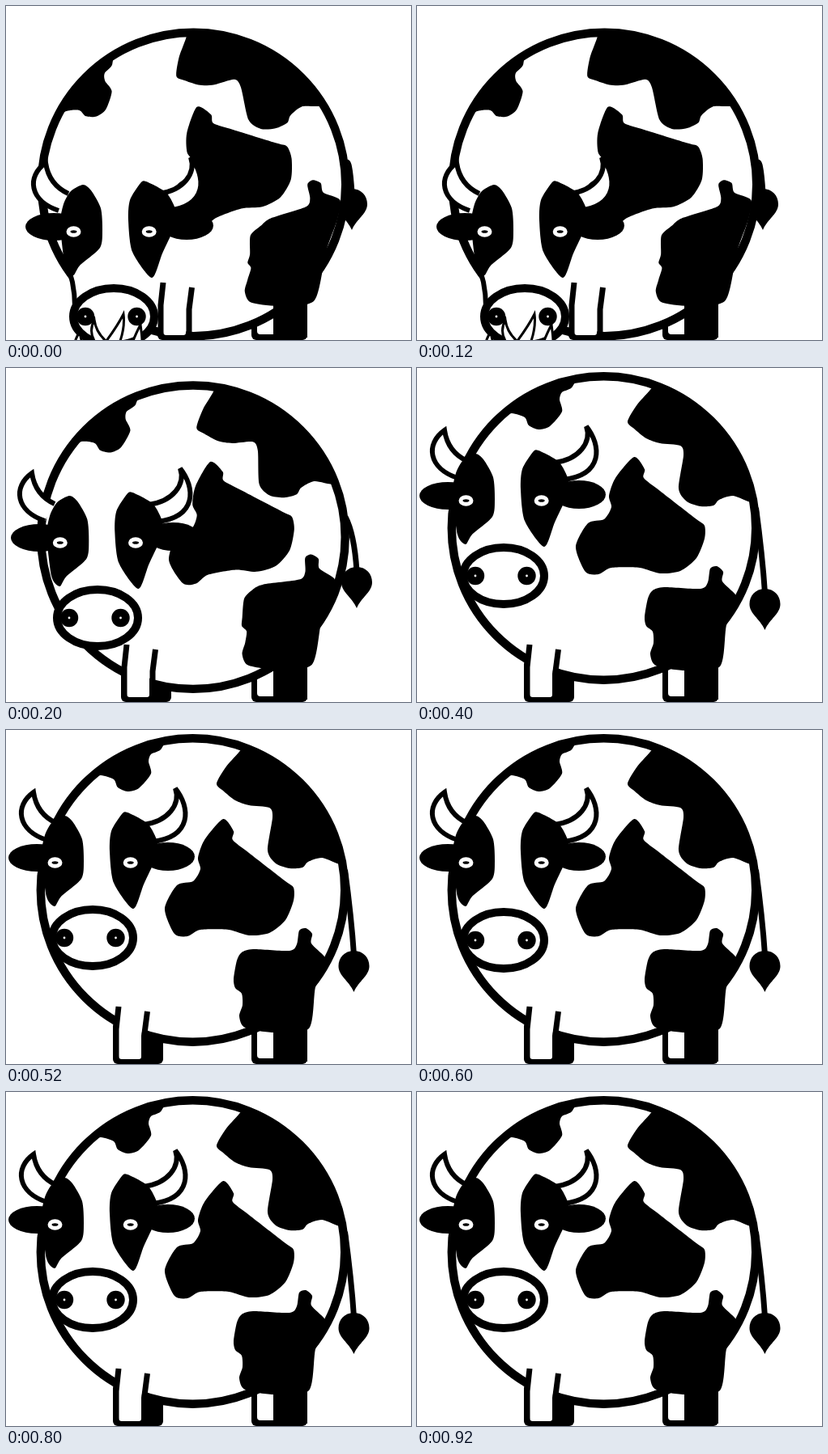
These frames come from a looping animation (500x413 px, 1 s). An HTML page:

```html
<!DOCTYPE html>
<html lang="en">
<head>
<meta charset="utf-8">
<title>Round cow</title>
<style>
  html, body { margin: 0; width: 100%; height: 100%; overflow: hidden; background: #fff; }
  svg { display: block; width: 100vw; height: 100vh; }
</style>
</head>
<body>
<svg id="stage" viewBox="0 0 500 413">
  <defs><clipPath id="inside"><circle id="clip" r="188"/></clipPath></defs>
  <g id="cow"></g>
</svg>
<script>
const cow = document.getElementById('cow');
const clip = document.getElementById('clip');
const STEP = 200;
const TURNS = [2, 1, 0, 0, 0];   // how far the body is rolled forward
const CHEW = 3;                  // the step on which the muzzle drops
const HOME = [230.5, 198];
const RADIUS = 187.7;

// Smooth curve over turn: 0 when upright, then mid, then low.
const bend = (t, mid, low) => mid * t * (2 - t) + low * t * (t - 1) / 2;
const clamp = v => Math.max(0, Math.min(1, v));

const ellipse = (x, y, rx, ry, extra = '') =>
  `<ellipse cx="${x}" cy="${y}" rx="${rx}" ry="${ry}" ${extra}/>`;
const line = (d, w, fill = 'none') =>
  `<path d="${d}" fill="${fill}" stroke="#000" stroke-width="${w}"/>`;
const foot = (x, w) => `<rect x="${x}" y="360" width="${w}" height="53" rx="6"/>`;
const move = (x, y, inner) => `<g transform="translate(${x} ${y})">${inner}</g>`;

// Closed soft outline through key points written as "x,y x,y".
const points = text => text.split(' ').map(p => p.split(',').map(Number));
function blob(pts) {
  const at = i => pts[(i + pts.length) % pts.length];
  const d = pts.map((b, i) => {
    const a = at(i - 1), c = at(i + 1), e = at(i + 2);
    const p = b.map((v, k) => v + (c[k] - a[k]) / 8);
    const q = c.map((v, k) => v - (e[k] - b[k]) / 8);
    return `C${p} ${q} ${c}`;
  });
  return `<path d="M${pts[0]}${d.join('')}Z"/>`;
}

const crown = points('291,23 272,45 260,66 268,75 283,87 300,93 325,96 329,108 323,149 333,165 350,171 366,170 373,163 390,158 430,160 425,10 300,0');
const brow = points('192,23 179,30 176,39 179,54 164,72 150,76 138,71 133,61 117,56 95,58 100,0 195,0');
const side = points('268,110 245,136 237,158 240,172 231,187 211,192 196,221 208,252 224,255 240,247 275,247 300,254 325,251 345,235 355,211 355,195 345,187 300,152 280,136 281,125');
const rump = points('285,285 291,275 305,271 350,273 359,265 362,248 370,245 378,252 377,264 393,280 395,290 382,318 374,369 330,374 295,368 288,354 292,340 291,326 283,319 281,308');

const patches = blob(points('72,106 57,114 48,130 44,155 50,206 60,218 68,206 93,184 96,162 94,135 82,113')) +
  blob(points('150,102 143,104 130,125 128,150 133,189 157,221 170,191 184,160 187,139 175,116'));

// The hide rolls around the body; grip below 1 leaves a point partly behind.
function roll(pts, t, degrees, grip = () => 1) {
  const a = -t * degrees * Math.PI / 180, cos = Math.cos(a), sin = Math.sin(a);
  const [cx, cy] = body(t);
  return pts.map(([x, y]) => {
    const u = x - HOME[0], v = y - HOME[1], g = grip(y);
    return [x + g * (cx + u * cos - v * sin - x), y + g * (cy + u * sin + v * cos - y)];
  });
}
const body = t => [HOME[0] + t / 2, HOME[1] + 11.2 * t];
const rumpGrip = y => y < 282 ? 1 : 0.13 + 0.47 * clamp((335 - y) / 30);

const leftHorn = line('M50 136C14 124 10 94 34 77Q38 104 62 115', 6, '#fff');
const rightHorn = line('M181 138C230 132 228 96 209 72C216 92 200 113 170 117', 6, '#fff');
const eye = x => ellipse(x, 164, 9, 6.8, 'fill="#fff"') + ellipse(x, 164, 4, 1.8);
const nostril = x => ellipse(x, 0, 11.2, 11.2) + ellipse(x, 0, 1.4, 1.4, 'fill="#fff"');
const muzzle = ellipse(0, 0, 50, 35, 'fill="#fff" stroke="#000" stroke-width="10"') +
  nostril(-35) + nostril(28.5);
const tuft = '<path d="M0-19C12-19 19-10 19 0C19 12 6 18 0 32C-6 18-19 12-19 0C-19-10-12-19 0-19Z"/>';

const blade = (x, y, left, right) =>
  line(`M${left} 414Q${x - 7} ${y + 14} ${x} ${y}Q${x + 2} ${y + 15} ${right} 414`, 3, '#fff');
const grass = blade(109, 388, 109, 123) + blade(145, 381, 124, 141) +
  blade(166, 394, 157, 168) + blade(91, 402, 86, 95);
const jaw = '<path fill="#fff" d="M75 318Q85 340 85 372L130 372V318Z"/>' +
  line('M73 314Q85 340 85 372', 6);

function frontLeg(x) {
  return `<path fill="#fff" d="M${x + 7} 345L${x + 41} 350L${x + 35} 378V404Q${x + 35} 407 ${x + 32} 407H${x + 11}Q${x + 7} 407 ${x + 7} 403Z"/>` +
    line(`M${x + 7} 342L${x + 4} 370V406`, 7) +
    line(`M${x + 42.5} 348L${x + 39} 375V406`, 7);
}

function draw(t, chewing) {
  const [x, y] = body(t);
  const drop = bend(t, 52, 115);
  const leg = 132 + bend(t, 10, 55);
  const tailX = 429.5 + bend(t, 3.5, -2.5), tailY = 292 + bend(t, -27, -47);
  const noseX = 107 + bend(t, 6, 26), noseY = 257 + bend(t, 52, 127) + (chewing ? 3 : 0);
  const headX = bend(t, 6.3, 23);
  const grazing = t === 2;

  clip.setAttribute('cx', x);
  clip.setAttribute('cy', y);
  cow.innerHTML =
    line(`M${x + 188} ${y - 25}Q${tailX - 3} ${tailY - 60} ${tailX} ${tailY - 14}`, 7) +
    move(tailX, tailY, tuft) +
    foot(leg, 62) + foot(303, 69) +
    '<path fill="#fff" d="M310 360H330V406H314Q310 406 310 402Z"/>' +
    ellipse(x, y, RADIUS, RADIUS, 'fill="#fff"') +
    `<g clip-path="url(#inside)">${blob(roll(crown, t, 10.8))}${blob(roll(brow, t, 10.8))}${blob(roll(side, t, 10.3))}</g>` +
    ellipse(x, y, RADIUS, RADIUS, 'fill="none" stroke="#000" stroke-width="10.4"') +
    blob(roll(rump, t, 10.3, rumpGrip)) +
    '<rect x="330" y="366" width="42" height="44"/>' +
    frontLeg(leg) +
    (grazing ? jaw : '') +
    move(bend(t, 3, 21), drop, ellipse(38, 158, 35, 17)) +
    move(headX, drop, ellipse(200, 156.5, 33, 17.5)) +
    move(bend(t, -2, 15), drop + t, leftHorn) +
    move(bend(t, 6, 19), drop, rightHorn) +
    move(headX, drop, patches + eye(60.5) + eye(153.7)) +
    move(noseX, noseY, muzzle) +
    (grazing ? grass : '');
}

let shown = -1;
const start = performance.now();
function tick() {
  const i = Math.floor((performance.now() - start) / STEP) % TURNS.length;
  if (i !== shown) draw(TURNS[i], i === CHEW);
  shown = i;
  requestAnimationFrame(tick);
}
tick();
</script>
</body>
</html>
```
